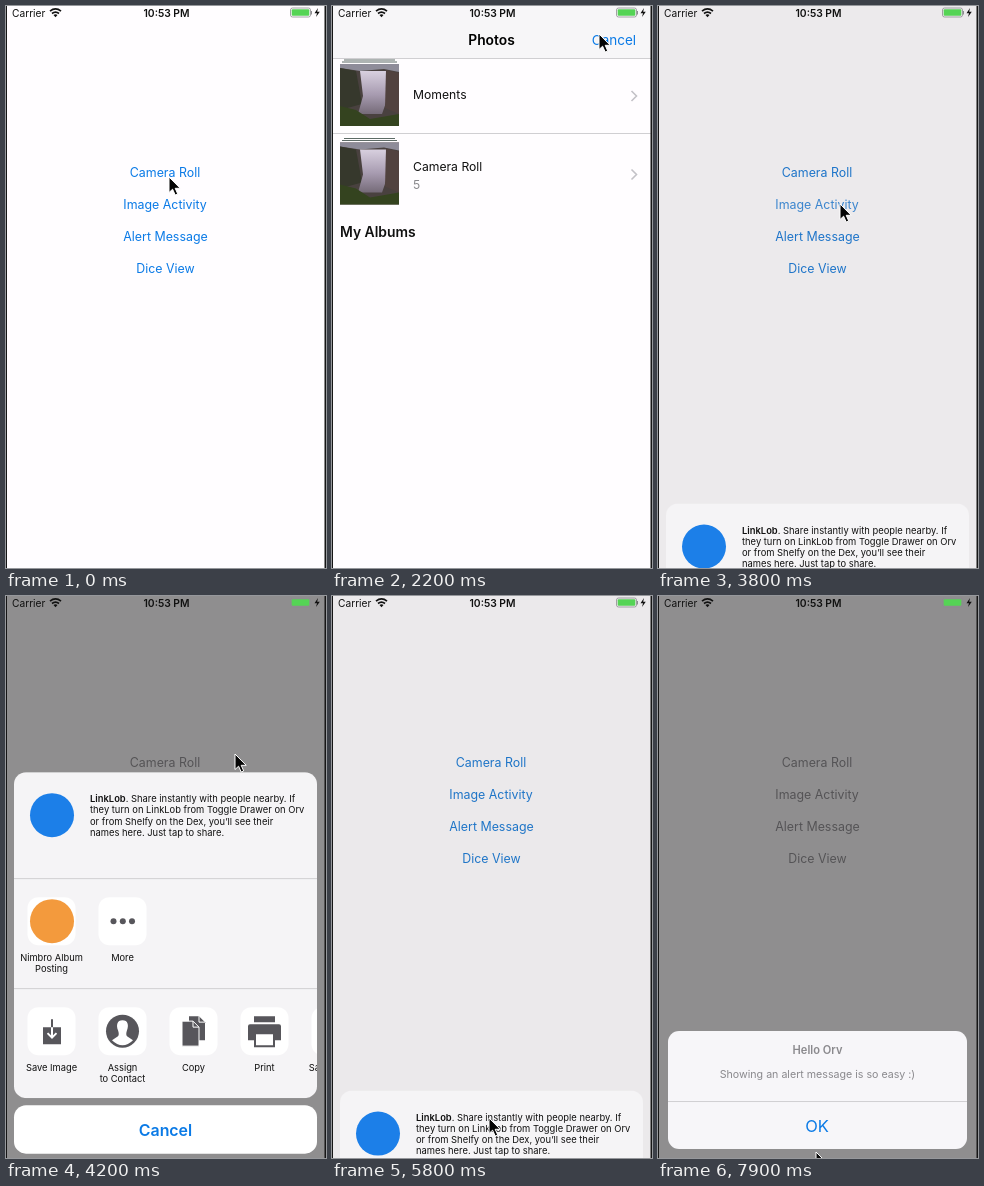
These frames come from a looping animation (320 px wide and 562 px high, 8000 ms). An HTML page:

```html
<!DOCTYPE html>
<html lang="en">
<head>
<meta charset="utf-8">
<style>
html, body { margin: 0; width: 100%; height: 100%; overflow: hidden; background: #fff; }
svg { display: block; width: 320px; height: 562px; font-family: Inter, "Liberation Sans", sans-serif; }
.mid { text-anchor: middle; }
.link { font-size: 12.4px; }
.row { font-size: 12.2px; fill: #111; }
.label { font-size: 9.3px; fill: #111; text-anchor: middle; }
.body { font-size: 9.4px; fill: #111; }
.bold { font-weight: 600; }
.blue { fill: #0a7ae6; }
.line { stroke: #d0cfd2; stroke-width: 1; }
</style>
</head>
<body>
<svg viewBox="0 0 320 562">
  <defs>
    <linearGradient id="mist" x1="0" y1="0" x2="0" y2="1">
      <stop offset="0" stop-color="#d8d0df"/>
      <stop offset=".55" stop-color="#a79bb0"/>
      <stop offset="1" stop-color="#756b78"/>
    </linearGradient>
    <clipPath id="panel"><rect x="8" y="175" width="303" height="326" rx="12"/></clipPath>
    <g id="thumb">
      <path d="M4 -4H55M2 -2H57" stroke="#5d6b66"/>
      <path d="M0 0H59V62H0Z" fill="#49413f"/>
      <path d="M0 0H59V8L44 5L20 7L0 4Z" fill="#8e8c99"/>
      <path d="M0 4L16 7L22 40L0 46Z" fill="#36382c"/>
      <path d="M20 7H46L49 30L42 50H18L23 32Z" fill="url(#mist)"/>
      <path d="M46 6L59 9V50L45 44Z" fill="#51423f"/>
      <path d="M0 42L16 46L30 55L59 50V62H0Z" fill="#34431f"/>
    </g>
    <path id="chevron" d="M0 -5L5 0L0 5" fill="none" stroke="#c3c2c7" stroke-width="1.6"/>
  </defs>

  <rect width="320" height="562" fill="#fffdff"/>
  <g id="links" class="link mid">
    <text x="159" y="171">Camera Roll</text>
    <text x="159" y="203">Image Activity</text>
    <text x="159.500" y="235">Alert Message</text>
    <text x="159.500" y="267">Dice View</text>
  </g>
  <rect id="dim" width="320" height="562"/>

  <g id="picker">
    <rect width="320" height="563" fill="#fffdff"/>
    <rect width="320" height="52" fill="#f7f6f8"/>
    <path class="line" d="M0 52.500H320M0 127.500H320"/>
    <text class="mid bold" x="159.500" y="39" font-size="13.8">Photos</text>
    <text id="close" class="mid blue" x="282" y="38.500" font-size="13.5">Cancel</text>
    <use href="#thumb" x="8" y="58"/>
    <use href="#thumb" x="8" y="136.500"/>
    <text class="row" x="81" y="93">Moments</text>
    <text class="row" x="81" y="165">Camera Roll</text>
    <text class="row" x="81" y="183" style="fill:#8a898d">5</text>
    <use href="#chevron" x="299.500" y="90"/>
    <use href="#chevron" x="299.500" y="168.500"/>
    <text class="bold" x="8" y="231" font-size="13.9" fill="#111">My Albums</text>
  </g>

  <g id="share">
    <g clip-path="url(#panel)">
      <rect x="8" y="175" width="303" height="326" fill="#f5f4f6"/>
      <path class="line" d="M8 281.500H311M8 391.500H311"/>
      <circle cx="46" cy="218" r="22" fill="#1c7fe8"/>
      <g class="body">
        <text x="84" y="205"><tspan class="bold">LinkLob</tspan>. Share instantly with people nearby. If</text>
        <text x="84" y="216.300">they turn on LinkLob from Toggle Drawer on Orv</text>
        <text x="84" y="227.600">or from Shelfy on the Dex, you’ll see their</text>
        <text x="84" y="238.900">names here. Just tap to share.</text>
      </g>
      <g id="tiles" fill="#fff"></g>
      <circle cx="46" cy="324" r="22" fill="#f39a3d"/>
      <g fill="#57565b">
        <circle cx="107.500" cy="324" r="3"/><circle cx="116.800" cy="324" r="3"/><circle cx="126" cy="324" r="3"/>
        <path d="M37 430H55V447H37Z"/>
        <circle cx="116.500" cy="434" r="16.500"/>
        <path d="M183 419H193L199 425V443H183Z"/>
        <path d="M176 424H187L193 430V449H176Z" stroke="#fff"/>
        <path d="M248 419H269V425H248ZM244 427H273Q275 427 275 429V443H242V429Q242 427 244 427Z"/>
      </g>
      <path d="M46 422V430" stroke="#57565b" stroke-width="2"/>
      <path d="M46 430V440M41.500 436L46 440.500L50.500 436" fill="none" stroke="#fff" stroke-width="2"/>
      <path d="M116.500 423C122 423 123 428 121 433C120 436 120 438 121 439L127 443Q122 448 116.500 448Q111 448 106 443L112 439C113 438 113 436 112 433C110 428 111 423 116.500 423Z" fill="#fff"/>
      <path d="M193 419V425H199M187 424V430H193" fill="none" stroke="#fff"/>
      <path d="M249 436H268V449H249Z" fill="#fff" stroke="#57565b" stroke-width="2"/>
      <g class="label">
        <text x="45.500" y="364">Nimbro Album</text><text x="45.500" y="375">Posting</text>
        <text x="116.500" y="364">More</text>
        <text x="45.500" y="474">Save Image</text>
        <text x="116.500" y="474">Assign</text><text x="116.500" y="485">to Contact</text>
        <text x="187.500" y="474">Copy</text>
        <text x="258.500" y="474">Print</text>
        <text x="330.500" y="474">Save to Files</text>
      </g>
    </g>
    <rect id="cancel" x="8" y="508" width="303" height="48.500" rx="12" fill="#fff"/>
    <text class="mid bold blue" x="159.500" y="538.500" font-size="15.9">Cancel</text>
  </g>

  <g id="alert">
    <rect x="10" y="435" width="299" height="118" rx="11" fill="#f7f6f9"/>
    <path class="line" d="M10 505.500H309"/>
    <g class="mid" fill="#8a898d">
      <text class="bold" x="159.500" y="458" font-size="11.1">Hello Orv</text>
      <text x="159.500" y="481.500" font-size="10.65">Showing an alert message is so easy :)</text>
    </g>
    <text class="mid blue" x="159" y="535.500" font-size="16.500">OK</text>
  </g>

  <g id="status">
    <text x="6" y="10.500" font-size="10.2" fill="#111">Carrier</text>
    <g fill="none" stroke="#111" stroke-width="1.700">
      <path d="M44 5.200Q49.500 .7 55 5.200M46 7.500Q49.500 4.700 53 7.500"/>
    </g>
    <path d="M47.500 9L49.500 11.200L51.500 9Q49.500 7.500 47.500 9Z" fill="#111"/>
    <text class="mid bold" x="160.500" y="10.500" font-size="10.3" fill="#111">10:53 PM</text>
    <rect x="284.500" y="2" width="20" height="9" rx="2" fill="none" stroke="#8d8c90" stroke-width=".8"/>
    <rect x="285.700" y="3.200" width="17.600" height="6.600" rx="1" fill="#55d455"/>
    <path d="M305.500 5V8.500" stroke="#8d8c90"/>
    <path d="M312 2L308.500 7.200H311L310 11L313.800 5.700H311.200Z" fill="#111"/>
  </g>
  <path d="M.5 0V562M319 0V562" stroke="#161616"/>
  <path d="M319.500 0V562" stroke="#161616"/>
  <path id="cursor" d="M0 0V15.500L3.600 12.200L6.200 18L8.700 16.900L6.200 11.300H11.200Z" fill="#050505" stroke="#fff" stroke-width="1"/>
</svg>
<script>
const $ = id => document.getElementById(id);
const links = [...$('links').children];
const LOOP = 8000, STEP = 100;

const tile = (col, y) => `<rect x="${21.5 + col * 71}" y="${y}" width="48" height="48" rx="11"/>`;
$('tiles').innerHTML = [0, 1].map(c => tile(c, 300)).join('') +
  [0, 1, 2, 3, 4].map(c => tile(c, 410)).join('');

// Pointer tip: time, x, y
const path = [
  [0, 163, 171], [1100, 163, 171], [2000, 267, 28], [2700, 267, 28], [3400, 182, 198],
  [3800, 182, 198], [4200, 229, 158], [4600, 229, 158], [5300, 157, 522], [5800, 157, 522],
  [6400, 175, 245], [7000, 168, 233], [7300, 168, 233], [7800, 158, 556], [8000, 158, 556]
];

const clamp = v => Math.max(0, Math.min(1, v));
const mix = (a, b, p) => a + (b - a) * p;

// Critically damped spring from 0 to 1
function spring(ms) {
  const x = Math.max(0, ms) * .01826;
  return 1 - (1 + x) * Math.exp(-x);
}
const shown = (t, open, close = Infinity) => spring(t - open) - spring(t - close);

function press(t, down, up) {
  if (t < down) return 1;
  return t < up ? .2 : mix(.2, 1, clamp((t - up) / 220));
}

function pointer(t) {
  const i = path.findIndex(k => k[0] > t);
  const [t0, x0, y0] = path[i - 1], [t1, x1, y1] = path[i];
  const u = (t - t0) / (t1 - t0), p = u * u * (3 - 2 * u);
  return [mix(x0, x1, p), mix(y0, y1, p)];
}

function slide(id, p, travel) {
  $(id).setAttribute('transform', `translate(0 ${travel * (1 - p)})`);
  $(id).style.display = p < .001 ? 'none' : '';
}

function draw(t) {
  const share = shown(t, 3760, 5626), alert = shown(t, 7330);
  const p = clamp(share + alert);
  slide('picker', shown(t, 450, 2450), 562);
  slide('share', share, 387);
  slide('alert', alert, 127);
  $('dim').setAttribute('opacity', .44 * p);

  const tint = [[10, 150], [122, 148], [230, 152]].map(([a, b]) => mix(a, b, p));
  $('links').setAttribute('fill', `rgb(${tint})`);
  links[0].style.opacity = press(t, 200, 350);
  links[1].style.opacity = press(t, 3500, 3620);
  links[2].style.opacity = press(t, 7100, 7250);
  $('close').style.opacity = press(t, 2300, 2450);
  $('cancel').setAttribute('fill', t >= 5500 && t < 5700 ? '#e9e8eb' : '#fff');
  $('cursor').setAttribute('transform', `translate(${pointer(t)})`);
}

const start = performance.now();
function frame() {
  const t = (performance.now() - start) % LOOP;
  draw(Math.floor(t / STEP) * STEP);
  requestAnimationFrame(frame);
}
frame();
</script>
</body>
</html>
```
